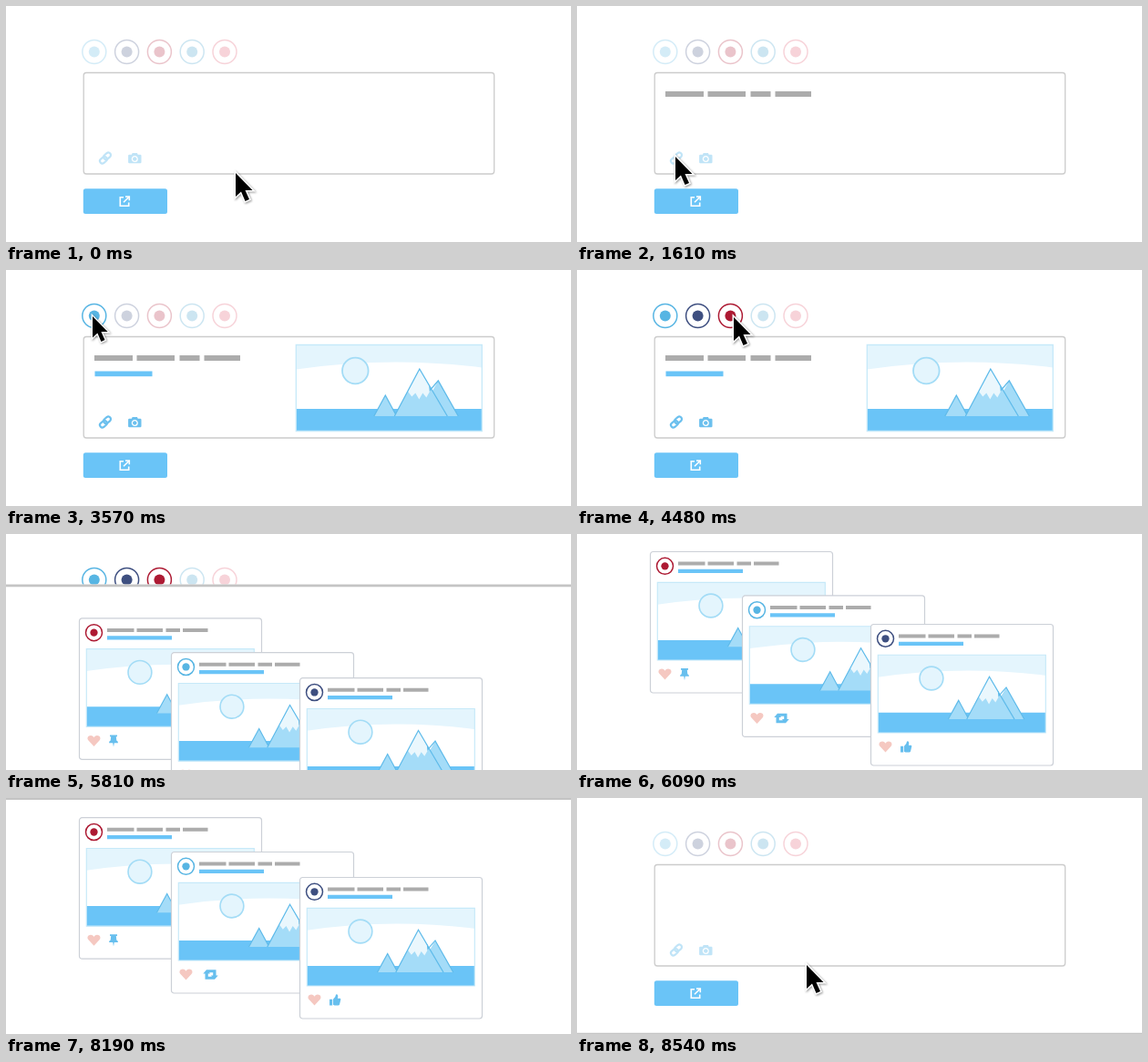
These frames come from a looping animation (620x260 px, 8680 ms). An HTML page:

```html
<!DOCTYPE html>
<html lang="en">
<head>
<meta charset="utf-8">
<title>Share everywhere</title>
<style>
  html, body { margin: 0; width: 100%; height: 100%; overflow: hidden; background: #fff; }
  svg { display: block; width: 620px; height: 260px; }
  .blue { fill: #6ac4f7; }
  .grey { fill: #acacac; }
  .tool { color: #6cc0ee; opacity: .42; }
  .net { opacity: .25; }
  .on { opacity: 1; }
  .ring { fill: #fff; stroke: currentColor; stroke-width: 1.5; }
  .dot { fill: currentColor; }
  .card { fill: #fff; stroke: #ccd0d7; stroke-width: 1.2; }
  .heart { fill: #f5c8c1; }
  .act { fill: #67bfee; }
  #button { fill: #6ac4f7; }
  #button.down { fill: #4fb0e8; }
  #cursor { filter: drop-shadow(1px 1.5px 1.2px rgba(0, 0, 0, .4)); }
</style>
</head>
<body>
<svg viewBox="0 0 620 260">
  <defs>
    <symbol id="scene" viewBox="0 0 204 95" overflow="visible">
      <path fill="#fff" d="M0 0H204V95H0Z"/>
      <path fill="#e4f5fd" d="M0 0H204V25Q102 12 0 27Z"/>
      <path class="blue" d="M0 70.5H204V95H0Z"/>
      <circle cx="65" cy="28.5" r="14.3" fill="#e4f5fd" stroke="#a3dcf6" stroke-width="1.8"/>
      <path fill="#a4dcf8" d="M85.5 78.5 98 55.5 110 78.5ZM134 78.5 156 39.5 178 78.5ZM108 78.5 135.5 26.5 166 78.5Z"/>
      <path fill="#eaf7fd" d="M135.5 26.5 122.5 51 127 57 131 53 135 60 139 53 143 58 148 49Z"/>
      <path fill="none" stroke="#5fbbea" stroke-width="1.3" d="M85.5 78.5 98 55.5 109 76M108 78.5 135.5 26.5 166 78.5M146.500 45 147 50 156 39.5 178 78.5"/>
      <path fill="none" stroke="#c6e9f9" stroke-width="1.3" d="M0 0H204V95H0Z"/>
    </symbol>
    <path id="heart" d="M0 6-6-.4C-8.200-3-6.500-6-3.500-6-1.700-6-.4-4.800 0-3.700.4-4.800 1.700-6 3.500-6 6.500-6 8.200-3 6-.4Z"/>
    <path id="pin" d="M-4-6.500H4V-4.700H2.800L3.300-.3Q5 .6 5 2.300H.8L0 6.700-.8 2.300H-5Q-5 .6-3.300-.3L-2.800-4.700H-4Z"/>
    <path id="repeat" d="M-4.300-5.500-.4-1H-2.700V2.300H1.600L4 5.200H-6V-1H-8.200ZM4.300 5.500.4 1H2.700V-2.300H-1.600L-4-5.200H6V1H8.200Z"/>
    <path id="thumb" d="M-6-.8H-2.800V6H-6ZM-2-.8Q.8-3 .8-5.200 1-6.500 2-6.300 4-5.800 2.900-1.800H5.500Q6.700-1.500 6.200 0L5 5Q4.700 6 3.500 6H-.5L-2 5.300Z"/>
  </defs>

  <g id="nets"></g>

  <rect x="85.200" y="73.500" width="450.500" height="111.500" rx="3" fill="#fff" stroke="#ccc" stroke-width="1.300"/>
  <clipPath id="typed"><rect id="reveal" x="97" y="90" width="0" height="14"/></clipPath>
  <path class="grey" clip-path="url(#typed)" d="M97 94h42v6h-42zM143.500 94h41.500v6h-41.500zM190.500 94h22v6h-22zM217.500 94h39.500v6h-39.500z"/>
  <rect id="url" class="blue" x="97.500" y="111.500" width="0" height="5.700"/>
  <g id="photo"><use href="#scene" x="-102" y="-47.500" width="204" height="95"/></g>

  <g id="link" class="tool" transform="translate(109 167.500) rotate(-40)" fill="none" stroke="currentColor" stroke-width="2.200">
    <rect x="-7.300" y="-2.300" width="8.600" height="5.400" rx="2.700"/>
    <rect x="-1.300" y="-3.100" width="8.600" height="5.400" rx="2.700"/>
  </g>
  <g id="camera" class="tool" transform="translate(141.300 168)" fill="currentColor">
    <path d="M-6-4.200H-3.500L-2.600-6H2.600L3.500-4.200H6Q7.200-4.200 7.200-3V4Q7.200 5.200 6 5.200H-6Q-7.200 5.200-7.200 4V-3Q-7.200-4.200-6-4.200Z"/>
    <circle cy=".5" r="2.900" stroke="#fff" stroke-width="1.300"/>
  </g>

  <rect id="button" x="84.800" y="201.300" width="92.200" height="27.800" rx="2.500"/>
  <path fill="none" stroke="#fff" stroke-width="1.600" d="M129 210.800H125.300V220.300H134.700V216.500M131 210H135.300V214.300M135 210.300 129 216.300"/>

  <g id="cursor">
    <path d="M0 0V26L6 20.500 10.500 31 15 29 10.500 19H18.500Z" stroke="#fff" stroke-width="3" paint-order="stroke"/>
  </g>

  <g id="sheet">
    <path fill="#fff" d="M0 0H620V300H0Z"/>
    <path fill="#c4c4c4" d="M0 0H620V2.800H0Z"/>
  </g>
</svg>

<script>
const LOOP = 8680, STEP = 70;
const $ = id => document.getElementById(id);
const place = (el, x, y, s = 1) => el.setAttribute('transform', `translate(${x} ${y}) scale(${s})`);
const span = (t, a, b) => Math.min(1, Math.max(0, (t - a) / (b - a)));
const ease = (t, a, b) => {
  const p = span(t, a, b);
  return p < .5 ? 4 * p ** 3 : 1 - 4 * (1 - p) ** 3;
};

// Networks: colour and the time each one is picked
const nets = [
  { color: '#57b5e3', at: 3570 },
  { color: '#3e4f80', at: 4060 },
  { color: '#ad1a33', at: 4340 },
  { color: '#3a9ccb', at: Infinity },
  { color: '#e0526a', at: Infinity }
];
const badge = (color, r) =>
  `<g color="${color}"><circle class="ring" r="${r}"/><circle class="dot" r="${r * .46}"/></g>`;
$('nets').innerHTML = nets.map((n, i) =>
  `<g class="net" transform="translate(${96.8 + i * 35.8} 50.500)">${badge(n.color, 13)}</g>`).join('');
const netEls = [...$('nets').children];

// Cards: place on the sheet, network, action icon and settling time
const cards = [
  { x: 80.5, y: 22.5, net: 2, icon: 'pin', ix: 37.5, from: 5800, to: 6110 },
  { x: 181.5, y: 60.3, net: 0, icon: 'repeat', ix: 43, from: 5940, to: 6300 },
  { x: 322.5, y: 88.3, net: 1, icon: 'thumb', ix: 38.5, from: 5980, to: 6440 }
];
for (const c of cards) {
  c.el = document.createElementNS('http://www.w3.org/2000/svg', 'g');
  c.el.innerHTML = `
    <rect class="card" width="200" height="155.500" rx="3"/>
    <g transform="translate(16 15.800)">${badge(nets[c.net].color, 9)}</g>
    <path class="grey" d="M30.500 11h29.500v4h-29.500zM63 11h28.500v4h-28.500zM95 11h15.500v4h-15.500zM113.500 11h27.500v4h-27.500z"/>
    <path class="blue" d="M30.500 19.300h71v4.200h-71z"/>
    <use href="#scene" x="7.800" y="33.800" width="184" height="85.700"/>
    <use href="#heart" class="heart" transform="translate(16 135)"/>
    <use href="#${c.icon}" class="act" transform="translate(${c.ix} 135)"/>`;
  $('sheet').append(c.el);
}

// Cursor moves: start, end, control point, target
const home = [252, 184];
const moves = [
  [1260, 1610, [195, 235], [108, 166]],
  [2030, 2520, [126, -61], [144, 165.5]],
  [3080, 3500, [184, 100], [95, 51]],
  [3780, 3990, [114, 52], [132, 51]],
  [4130, 4340, [152, 52], [172, 52]],
  [4760, 5180, [650, 125], [130, 216]]
];
const clicks = [1750, 2590, 3570, 4060, 4340, 5180];
const pressed = (t, c) => t >= c && t < c + 2 * STEP;

function cursorAt(t) {
  let from = home;
  for (const [a, b, mid, to] of moves) {
    if (t < b) {
      const p = ease(t, a, b), q = 1 - p;
      return from.map((v, i) => q * q * v + 2 * p * q * mid[i] + p * p * to[i]);
    }
    from = to;
  }
  return from;
}

function drawComposer(t) {
  $('reveal').setAttribute('width', 161 * span(t, 420, 1120));
  $('url').setAttribute('width', 63 * span(t, 1680, 1890));
  const shown = span(t, 2590, 2940);
  $('photo').setAttribute('opacity', shown);
  place($('photo'), 420.3, 130, .927 + .073 * shown);
  $('link').classList.toggle('on', t >= 1750);
  $('camera').classList.toggle('on', t >= 2590);
  nets.forEach((n, i) => netEls[i].classList.toggle('on', t >= n.at));
  $('button').classList.toggle('down', pressed(t, 5180));
  place($('cursor'), ...cursorAt(t), clicks.some(c => pressed(t, c)) ? .9 : 1);
}

function drawSheet(t) {
  const up = ease(t, 5550, 5970) - ease(Math.min(t, 8540), 8130, 8600);
  place($('sheet'), 0, 261 - 264 * up);
  for (const c of cards) place(c.el, c.x, c.y + 15 * (1 - ease(t, c.from, c.to)));
}

// The picture advances in even steps
function frame() {
  const t = Math.floor(performance.now() % LOOP / STEP) * STEP;
  drawComposer(t < 7000 ? t : 0);
  drawSheet(t);
  requestAnimationFrame(frame);
}
frame();
</script>
</body>
</html>
```
